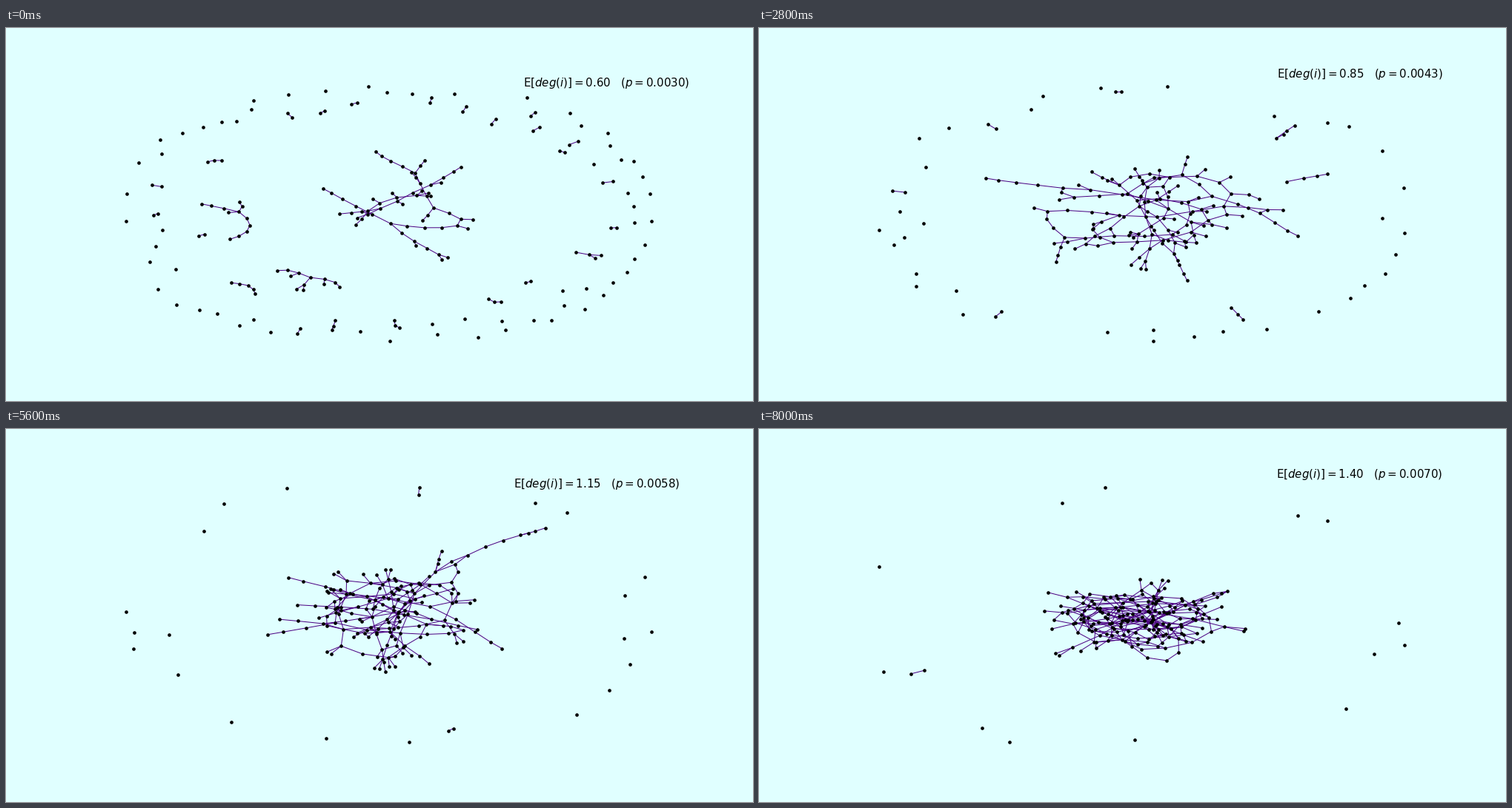
Write a matplotlib script that moves like this. It is 1008 by 504 pixels and loops after 8.4 s.

```python
import numpy as np
import matplotlib.pyplot as plt
from matplotlib.animation import FuncAnimation
from matplotlib.collections import LineCollection

WIDTH, HEIGHT, DPI = 1008, 504, 72
NODES = 200
TICK_MS = 400
DEGREES = np.linspace(0.6, 1.4, 20)
STEPS = [0, 1, 2, 2] + list(range(3, 20))  # the third graph is held twice as long

# Node centres always fill this box (pixels, y down).
LEFT, RIGHT, TOP, BOTTOM = 162.2, 871.2, 79.4, 423.4

# Right edge and top of the label for each graph.
LABEL_SPOTS = [
    (921, 67), (927, 67), (915, 69), (927, 61), (935, 55),
    (939, 58), (922, 55), (915, 60), (931, 48), (920, 63),
    (928, 66), (923, 64), (917, 55), (908, 67), (943, 69),
    (938, 58), (963, 60), (954, 56), (927, -1), (921, 54),
]
LABEL_WIDTH, LABEL_ASCENT = 223, 12


def random_graph(rng, p):
    """Adjacency matrix where each ordered pair is linked with chance p.

    Redrawn until the number of isolated nodes is close to its mean.
    """
    expected = NODES * (1 - p) ** (2 * (NODES - 1))
    while True:
        links = rng.random((NODES, NODES)) < p
        np.fill_diagonal(links, False)
        adjacency = links | links.T
        isolated = np.sum(~adjacency.any(axis=1))
        if abs(isolated - expected) <= 3:
            return adjacency


def spring_layout(rng, adjacency, iterations=50):
    """Fruchterman-Reingold layout, scaled to the unit square."""
    pos = rng.random((NODES, 2))
    k = np.sqrt(1 / NODES)
    temperature = 0.1 * np.ptp(pos, axis=0).max()
    cooling = temperature / (iterations + 1)
    for _ in range(iterations):
        delta = pos[:, None] - pos[None]
        dist = np.maximum(np.hypot(delta[..., 0], delta[..., 1]), 0.01)
        force = k * k / dist**2 - adjacency * dist / k
        push = (delta * force[..., None]).sum(axis=1)
        length = np.hypot(push[:, 0], push[:, 1])
        length = np.where(length < 0.01, 0.1, length)
        pos += push * (temperature / length)[:, None]
        temperature -= cooling
    return (pos - pos.min(axis=0)) / np.ptp(pos, axis=0)


def build_scene(step):
    rng = np.random.default_rng(step)
    adjacency = random_graph(rng, DEGREES[step] / (NODES - 1))
    unit = spring_layout(rng, adjacency)
    points = np.array([LEFT, TOP]) + unit * [RIGHT - LEFT, BOTTOM - TOP]
    pairs = np.argwhere(np.triu(adjacency))
    return points, points[pairs]


scenes = [build_scene(step) for step in range(len(DEGREES))]

fig = plt.figure(figsize=(WIDTH / DPI, HEIGHT / DPI), dpi=DPI, facecolor="lightcyan")
ax = fig.add_axes([0, 0, 1, 1])
ax.set(xlim=(0, WIDTH), ylim=(HEIGHT, 0))
ax.axis("off")

edges = LineCollection([], colors="indigo", linewidths=1, zorder=1)
ax.add_collection(edges, autolim=False)
dots = ax.scatter([], [], s=10, c="black", linewidths=1.5, zorder=2)
label = ax.text(0, 0, "", fontsize=15, family="DejaVu Sans",
                ha="left", va="baseline", zorder=3)


def draw(tick):
    step = STEPS[tick]
    points, segments = scenes[step]
    dots.set_offsets(points)
    edges.set_segments(segments)

    degree = DEGREES[step]
    p = degree / (NODES - 1)
    right, top = LABEL_SPOTS[step]
    label.set_position((right - LABEL_WIDTH, top + LABEL_ASCENT))
    label.set_text(rf"$\mathrm{{E}}[deg(i)]={degree:.2f}$   $(p={p:.4f})$")
    return edges, dots, label


anim = FuncAnimation(fig, draw, frames=len(STEPS), interval=TICK_MS,
                     init_func=lambda: draw(0), repeat=True, repeat_delay=0)
plt.show()
```
